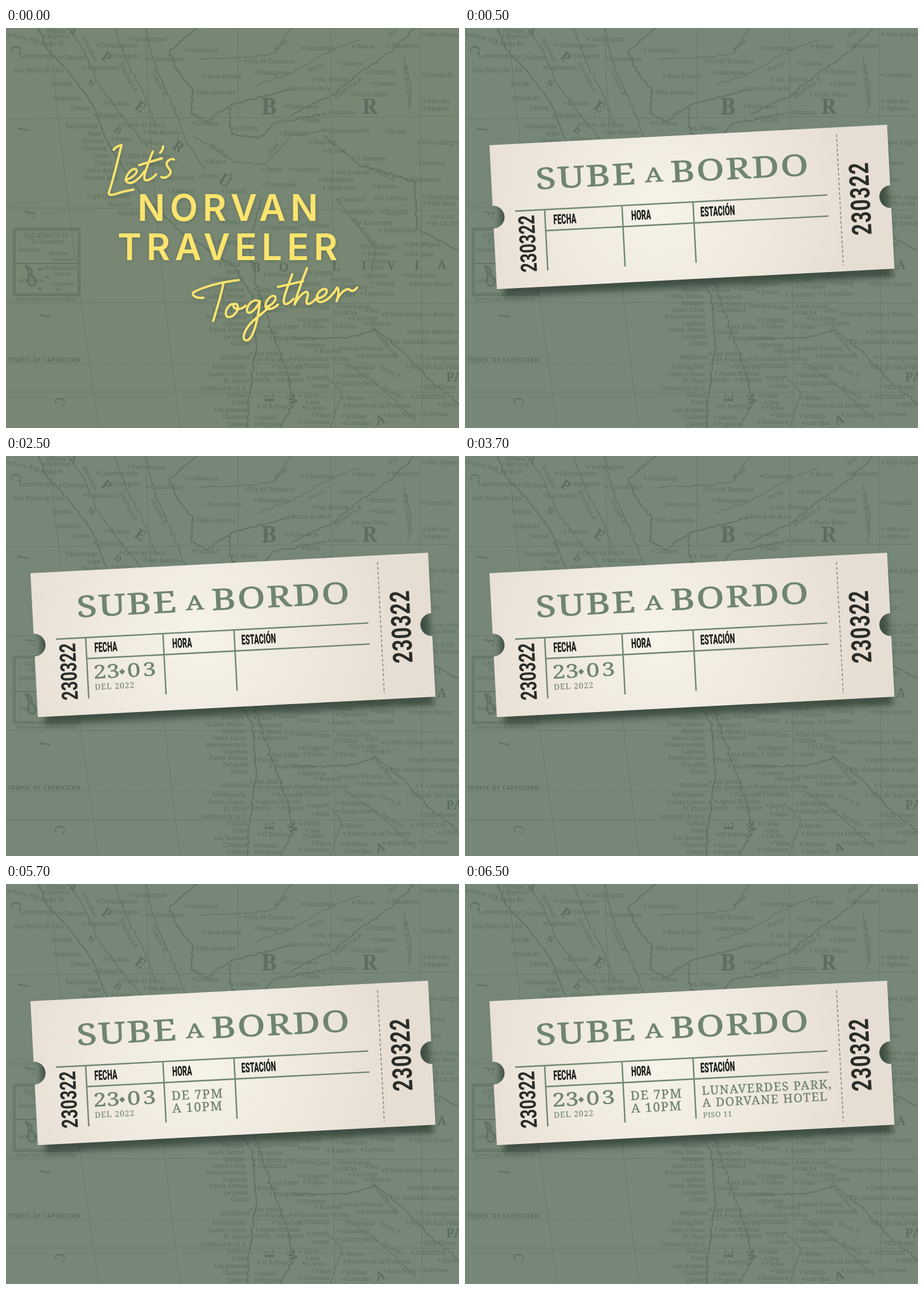
Write an HTML page that moves like this. It is 796x703 px and loops after 8 s.

```html
<!DOCTYPE html>
<html lang="es">
<head>
<meta charset="utf-8">
<title>Sube a bordo</title>
<style>
  html, body { margin: 0; width: 100%; height: 100%; overflow: hidden; background: #768777; }
  svg { display: block; width: 100vw; height: 100vh; }
  #map { fill: #5d6e5f; font: 500 10.5px "Noto Serif", serif; }
  #map path, #map circle { fill: none; stroke: #5d6e5f; }
  #lines path { stroke-width: .8; opacity: .75; }
  #intro { fill: #fde46e; filter: drop-shadow(1px 2px 3px rgba(60, 78, 62, .35)); }
  #intro text { font: 600 64px Inter, sans-serif; letter-spacing: 8.4px; }
  #intro path { fill: none; stroke: #fde46e; stroke-width: 4; stroke-linecap: round; stroke-linejoin: round; }
  #shade { fill: #26352b; opacity: .68; filter: blur(6px); }
  #paper { fill: url(#cream); }
  #rules { fill: none; stroke: #718975; stroke-width: 2.6; }
  .slab { fill: #6f8571; stroke: #6f8571; stroke-width: .4; font: 21px "Noto Serif", serif; letter-spacing: 1.6px; }
  .title { font-size: 52px; font-weight: 300; letter-spacing: 2px; stroke-width: .9; }
  .small { font-size: 14px; letter-spacing: 1px; stroke-width: .1; }
  .label { fill: #1c1f1b; font: 800 24px Roboto, sans-serif; }
  .serial { fill: #2a2d28; font: 600 39.4px Roboto, sans-serif; }
</style>
</head>
<body>
<svg viewBox="0 0 796 703" preserveAspectRatio="none">
  <defs>
    <radialGradient id="cream" gradientUnits="userSpaceOnUse" cx="290" cy="130" r="350">
      <stop offset="0" stop-color="#f6f3e9"/>
      <stop offset=".5" stop-color="#efe9de"/>
      <stop offset="1" stop-color="#e7ded3"/>
    </radialGradient>
  </defs>
  <rect id="sea" width="796" height="703"/>

  <g id="map">
    <g id="lines">
      <path d="M76 0Q106 320 163 703M245 0Q256 330 306 703M408 0V160M570 0L578 703M727 0L732 703"/>
      <path d="M0 160L796 155M0 316L796 320M0 482L796 484M0 640H796"/>
      <path d="M0 590H796" stroke-dasharray="7 3" stroke-width="1.2"/>
    </g>
    <g id="inset">
      <path d="M13 352H130V470H13ZM16 355H127V467H16ZM16 414H127" stroke-width="1.3"/>
      <path d="M34 418q14 4 10 16q12 8 6 18q-10 4-12-8q6-12-4-26M56 424h8M68 438h7M56 458h6" stroke-width="4" opacity=".8"/>
    </g>
  </g>

  <g id="intro">
    <g role="img" aria-label="Let's">
      <path d="M189 214Q194 207 203 206C198 225 190 262 181 288C179 296 188 293 195 291C203 288 213 286 224 284"/>
      <path d="M210 267C222 264 232 255 229 249C225 244 214 253 211 264C209 274 220 274 227 269C234 264 240 257 244 251"/>
      <path d="M258 217C251 235 243 254 243 263C243 272 255 267 264 257M234 241L274 229M276 208q0 6-5 11"/>
      <path d="M295 231C289 228 280 235 283 242C286 248 292 251 288 257C284 263 277 264 273 262"/>
    </g>
    <text x="231" y="339">NORVAN</text>
    <text x="196" y="408">TRAVELER</text>
    <g role="img" aria-label="Together">
      <path d="M347 474C336 476 325 470 329 465C345 455 380 446 409 443M382 449C378 470 370 495 364 515"/>
      <path d="M400 485C390 485 383 500 388 507C396 512 410 498 407 488C405 483 398 484 400 490C404 497 415 494 421 488"/>
      <path d="M444 480C434 474 420 490 424 499C430 505 442 490 446 480C444 505 436 545 424 549C412 550 418 530 434 515C446 504 456 498 462 490"/>
      <path d="M456 490C468 488 476 478 473 472C468 467 456 478 456 488C457 498 470 494 478 486"/>
      <path d="M503 433C497 450 488 470 488 480C489 490 498 484 505 476M478 455L522 445"/>
      <path d="M529 422C522 440 512 465 507 486C514 472 526 460 530 465C533 470 524 482 530 485C536 486 543 478 548 472"/>
      <path d="M546 476C558 474 566 466 563 460C558 455 546 464 546 475C547 486 560 482 570 472C576 466 580 460 582 456"/>
      <path d="M582 456C586 460 584 470 581 480C586 466 598 456 604 460C608 464 612 462 617 456"/>
    </g>
  </g>

  <g id="ticket" transform="translate(43 206) rotate(-2.95)">
    <rect id="shade" x="12" y="30" width="683" height="237"/>
    <path id="paper" d="M0 0H699.5V106.5a20 20 0 0 0 0 40V253.3H0V146.5a20 20 0 0 0 0-40Z"/>
    <g id="rules">
      <path d="M39 118H588.5M91 155H588.5M91 118V225M227 118V225M352 118V225"/>
      <path d="M610 12V243" stroke="#8a8f85" stroke-width="1.8" stroke-dasharray="5 3.5"/>
    </g>
    <g class="slab">
      <text class="title" transform="translate(78 81.5) scale(1.27 1)">SUBE</text>
      <text class="title" transform="translate(270 79) scale(1.27 1)" style="font-size:35px">A</text>
      <text class="title" transform="translate(315 81.5) scale(1.27 1)">BORDO</text>
    </g>
    <g class="label">
      <text transform="translate(105.5 144.5) scale(.53 1)">FECHA</text>
      <text transform="translate(242.5 144.5) scale(.53 1)">HORA</text>
      <text transform="translate(364 144.5) scale(.53 1)">ESTACIÓN</text>
    </g>
    <g class="serial">
      <text transform="translate(72 226.5) rotate(-90) scale(.74 1)">230322</text>
      <text transform="translate(662.5 191.5) rotate(-90) scale(.74 1)" style="font-size:47.8px;letter-spacing:1.5px">230322</text>
    </g>
    <g class="slab" data-from="2500">
      <g style="font-size:33px">
        <text transform="translate(101 191) scale(1.27 1)" style="letter-spacing:0">23</text>
        <text transform="translate(161 191) scale(1.27 1)" style="letter-spacing:3px">03</text>
      </g>
      <path d="M152 176l5 5-5 5-5-5Z"/>
      <text class="small" x="102.5" y="210.5">DEL 2022</text>
    </g>
    <g class="slab" data-from="4500">
      <text x="239" y="186.5" style="font-size:22px">DE 7PM</text>
      <text x="239" y="208.5" style="font-size:22px">A 10PM</text>
    </g>
    <g class="slab" data-from="6500">
      <text x="364.5" y="183.5">LUNAVERDES PARK,</text>
      <text x="364.5" y="205">A DORVANE HOTEL</text>
      <text class="small" x="364.5" y="224" style="font-size:13px;letter-spacing:.6px">PISO 11</text>
    </g>
  </g>
</svg>

<script>
const $ = id => document.getElementById(id);
const map = $('map');

function add(tag, attrs, text) {
  const el = document.createElementNS('http://www.w3.org/2000/svg', tag);
  for (const key in attrs) el.setAttribute(key, attrs[key]);
  if (text) el.textContent = text;
  map.append(el);
}

// "x y name" on each line, with a small town ring before the name
function towns(list) {
  for (const line of list.trim().split('\n')) {
    const [, x, y, name] = line.match(/(\d+) (\d+) (.+)/);
    add('text', { x, y }, name);
    add('circle', { cx: x - 5, cy: y - 4, r: 2 });
  }
}

// names along the coast, right-aligned, on an even step
function coast(x, y, dx, dy, names) {
  names.split(',').forEach((name, i) =>
    add('text', { x: x + dx * i, y: y + dy * i, 'text-anchor': 'end' }, name));
}

// "x y angle size name" on each line, centred
function turned(list, style) {
  for (const line of list.trim().split('\n')) {
    const [, x, y, angle, size, name] = line.match(/(\d+) (\d+) (-?\d+) (\d+) (.+)/);
    add('text', {
      transform: `translate(${x} ${y}) rotate(${angle})`, dy: '.36em',
      'text-anchor': 'middle', style: `font-size:${size}px;${style}`
    }, name);
  }
}

let seed = 7;
const random = () => (seed = seed * 16807 % 2147483647) / 2147483647;

// a meandering line through a few points
function river(points, width, dash = 'none') {
  const p = points.split(' ').map(s => s.split(',').map(Number));
  let d = 'M' + p[0];
  for (let i = 1; i < p.length; i++) {
    const [ax, ay] = p[i - 1], [bx, by] = p[i];
    const n = Math.ceil(Math.hypot(bx - ax, by - ay) / 8);
    for (let k = 1; k <= n; k++) {
      const x = ax + (bx - ax) * k / n, y = ay + (by - ay) * k / n;
      const jog = () => (random() - .5) * 9;
      d += `Q${x + jog()} ${y + jog()} ${x} ${y}`;
    }
  }
  add('path', { d, 'stroke-width': width, 'stroke-dasharray': dash, opacity: .85 });
}

river('58,0 72,38 104,70 150,130 180,205 235,290 300,352 400,418 432,470 440,560 428,640 425,703', 2);
river('108,0 136,36 160,95 200,150 250,210', 1.4);
river('190,0 212,60 240,110 262,170', 1.3);
river('246,0 262,70 290,130 318,200 350,250', 1.5);
river('335,0 288,42 300,75 328,108 325,150 352,165 395,135 500,108', 2);
river('340,55 420,52 470,45 500,0', 1.3);
river('440,100 500,80 560,45 620,20', 1.2);
river('500,152 570,120 620,80 680,38 718,0', 1.8);
river('330,190 400,235 455,240 500,190 560,180', 1.3);
river('698,50 712,100 708,150', 1.2);
river('560,190 620,240 718,270 722,352 796,392', 2);
river('580,300 620,350 650,390 640,440', 1.2);
river('392,140 396,188 450,192 470,168 562,150', 2.6, '6 2');
river('450,300 425,380 440,450 470,540 492,600 505,660 482,703', 2.4, '7 2');
river('500,545 600,545 650,530 700,570 750,625 796,660', 1.8);
river('596,588 650,625 720,690', 1.3);
river('560,610 590,640 570,703', 1.2);

towns(`
78 9 Piura
72 18 Bayovar
60 31 Aguja Pt.
100 55 Chiclayo
166 34 Chachapoyas
144 73 Cajamarca
191 53 Tarapoto
221 23 Yurimaguas
254 58 Contamana
322 43 Constança
426 62 Foz de Tarauaca
355 89 Bom Futuro
334 117 Villa Andrada
443 82 Maniquiau
526 39 Canutama
501 110 Bocca do Acre
546 94 Sta. Helena
497 142 Porto Acre
573 152 Abuman
614 121 Porto Velho
592 66 Labrea
616 36 Bastas
640 81 Humayta
648 101 Calama
678 35 Manicoré
739 15 Alto Aripuanã
738 86 Carapichi
740 132 Alto dos
740 145 Apiácas
527 166 Bella
334 171 Cocama
402 180 S. Pedro
206 174 Cerro de Pasco
249 187 San Ramón
181 136 Huaras
161 157 Huanuco`);

towns(`
193 199 Sayán
243 205 Tarma
208 229 LIMA Huancayo
218 243 Huancavelica
283 267 Ayacucho
290 290 Abancay
345 264 Cuzco
385 290 Sicuani
357 238 Manu
456 252 Heath
506 252 Guayaros
457 279 Tumupasa
487 189 Riberalta
564 184 Guayaramerim
671 185 Urupá
540 204 Nazaret
566 220 S. José
616 233 S. Antonio
580 257 San Joaquin
556 270 Magdalena
564 285 Santa Ana
652 282 Baures
731 205 Pouso Alegre
732 241 Juruena
709 270 Pimenteiro
587 305 Trinidad
654 303 El Carmen
595 327 Limoquije
666 328 Yaguará
628 346 Ascensión
664 359 Concepcion
739 301 Matto Grosso
741 312 Villa Bella
754 335 S. Luiz
748 347 de Cáceres
385 345 Puno
455 354 Copacabana
526 351 Covendo
370 380 Arequipa
382 419 Tacna
460 437 Andamarca
540 434 Alquile`);

towns(`
629 388 Portachuelo
635 400 Warnes
641 413 Santa
641 424 Cruz
634 439 Florida
708 384 San Miguel
708 401 San Juan
704 438 Santa Ana
650 452 Izozog
716 454 Puerto Suárez
577 447 SUCRE
630 470 Lagunillas
442 464 Tana
440 476 Tarapacá
478 461 Salinas
498 453 Tinguipaya
588 458 Tarabuco
521 468 Potosí
571 472 Azurduy
442 489 La Noria
442 499 Gallinazos
497 492 Tomabe
543 494 Caiza
589 493 San Lucas
584 504 Calcha
639 501 Ivo
609 514 La Loma
639 523 Montes
521 517 Cotagaita
586 528 Tarija
529 528 Talina
466 529 San Pablo
442 538 Polapto
470 549 Chuquiambata
667 507 Fuerte Olimpo e Borbon
712 538 Puerto Martinho
675 555 Ftn. Guachalla
757 556 Casado`);

towns(`
520 561 Quetena
551 571 Rosario
592 567 Santa Victoria
624 580 Embarcación
578 585 Oran
506 585 Humahuaca
436 576 San Pedro
440 586 de Atacama
474 599 Domeyko
523 598 Tumbaya
603 600 Ledesma
589 614 Rivadavia
589 628 Campo Santo
446 611 Aguas Blancas
431 622 Desvio
483 622 Poquois
536 618 Jujuy
544 633 Salta
523 650 Cachi
534 662 San
529 671 Carlos
597 654 Metan
600 667 Rosario de la Frontera
544 684 Vipos
521 696 Tucuman
596 686 Antillas
600 698 Las Ojas
669 684 Avia-Terai
733 682 Formosa
449 669 El Refresco
444 688 Salado
444 700 Puquios
727 583 V. Concepción
711 600 Villa de San Pedro
735 635 Villa Hayes
719 652 ASUNCION
766 666 Villeta`);

coast(88, 53, 14.5, 24.5, 'Lambayeque,San Pedro de Lloc,Trujillo,Chimbote');
coast(147, 144, 0, 0, 'Casma');
coast(162, 176, 5, 13, 'Paramonga,Supe,Huacho,Chancay,Callao,Chilca,Cerro Azul,Chincha Alta');
coast(218, 299, 7, 15, 'Cape Quemada,Nasca Pt.,Nicolás');
coast(412, 432, 2, 12, 'Arica,Camarones');
coast(418, 463, 1.1, 11.9, 'Pisagua,Caleta Buena,Iquique,Santa Lucia,Buenaventura,Lagunas,Punta Arenas,Tocopilla,Gatico,,Mejillones');
coast(421, 599, .8, 12.6, 'Antofagasta,Caleta Coloso,Pt. Plata,Cachinal de la S.,Salinas,Taltal,Las Bombas,Chañaral,Caldera');

turned(`
148 38 62 10 Marañon
216 88 62 10 Huallaga R.
270 98 62 10 Ucayali R.
482 30 -40 10 Juruá
546 68 -25 10 Purús
602 104 -35 11 Madeira R.
680 8 -35 11 Rio
706 102 82 10 Rio Roosevelt
375 215 35 10 Madre
470 212 -50 11 Dios
658 254 25 11 Guaporé R.
630 358 50 11 Rio Grande
666 552 50 10 Pilcomayo R.
676 604 25 10 Teuco R.
680 640 28 10 Bermejo
28 16 12 10 Sechura Bay`, 'font-style:italic;letter-spacing:.6px');

turned(`
118 6 35 16 A
150 97 35 15 N
197 180 35 15 D
177 51 35 23 P
236 138 35 25 E
303 208 35 25 R
385 268 35 28 Ú
462 138 0 40 B
639 137 0 38 R
440 420 0 22 B
488 420 0 22 O
580 418 0 22 L
629 417 0 22 I
677 417 0 22 V
722 417 0 22 I
766 416 0 22 A
463 651 -90 22 E
503 652 70 20 M
657 688 -20 22 A
788 613 0 22 PA`, 'font-weight:700');

turned(`
18 38 100 24 C
30 178 100 24 I
42 327 100 24 F
69 506 100 24 I
95 656 100 24 C`, 'opacity:.85');

turned(`
71 364 0 11 GALAPAGOS IS.
71 375 0 10 (To Ecuador)
41 390 0 9 Abingdon
92 396 0 9 Bindloe
100 407 0 7 EQUATOR 0°
95 422 0 9 Indefatigable
98 432 0 9 Chaves
100 450 0 9 Chatham
44 444 0 9 Albemarle
92 460 0 8 90°
71 476 0 9 Same scale as main Map.`, '');
turned('67 583 0 10 TROPIC OF CAPRICORN', 'font-family:"Noto Sans",sans-serif;font-weight:600;letter-spacing:.7px');

const fields = document.querySelectorAll('[data-from]');
const show = (el, on) => el.style.display = on ? '' : 'none';

function draw(now) {
  const t = now % 8000, opening = t < 500;
  show($('intro'), opening);
  show($('ticket'), !opening);
  $('sea').setAttribute('fill', opening ? '#778773' : '#768777');
  fields.forEach(el => show(el, t >= +el.dataset.from));
  requestAnimationFrame(draw);
}
draw(performance.now());
</script>
</body>
</html>
```
